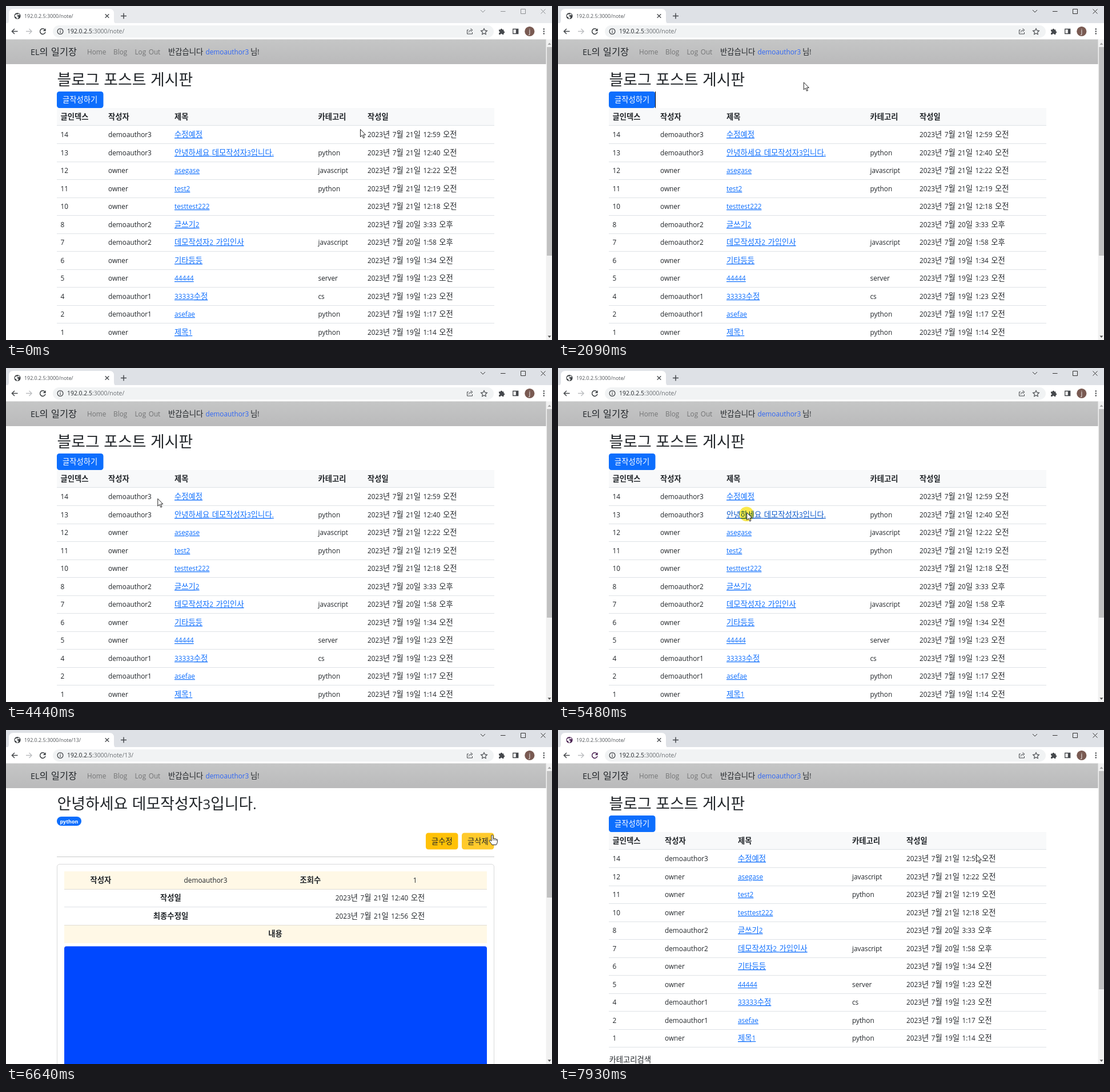
An HTML page that plays this animation: 956x586 px, repeating every 7990 ms.

```html
<!DOCTYPE html>
<html lang="ko">
<head>
<meta charset="utf-8">
<title>Board</title>
<style>
  html, body { margin: 0; width: 100%; height: 100%; overflow: hidden; background: #fff; }
  svg { display: block; width: 956px; height: 586px; fill: #212529; word-spacing: .12em;
        font: 11.8px "Open Sans", "Noto Sans CJK KR", "Noto Sans CJK JP", sans-serif; }
  .ko { font-family: "Noto Sans CJK KR", "Noto Sans CJK JP", sans-serif; font-size: 1.13em; }
  .bold { font-weight: 700; }
  .mid { text-anchor: middle; }
  .heading { font-size: 23.8px; }
  .link { fill: #0d6efd; text-decoration: underline 1px; }
  .link.over { fill: #0a58ca; }
  .blue { fill: #0d6efd; }
  .blue.over { fill: #0b5ed7; }
  .yellow { fill: #ffc107; }
  .yellow.over { fill: #ffca2c; }
  .icon { fill: none; stroke: #45484c; stroke-width: 1.3; }
  .muted { fill: #737475; }
  #click { fill: #fbe94a; mix-blend-mode: multiply; }
</style>
</head>
<body>
<svg id="stage" viewBox="0 0 956 586"></svg>
<script>
const LOOP = 7990;
const HOST = '192.0.2.5', PORT = ':3000', LIST = '/note/', POST = '/note/13/';
const GREETING = '안녕하세요 데모작성자3입니다.';

// Hangul runs are set a little larger than the Latin around them.
const text = (x, y, s, attrs = '') =>
  `<text x="${x}" y="${y}" ${attrs}>${s.replace(/[가-힣]+/g, '<tspan class="ko">$&</tspan>')}</text>`;
const rect = (x, y, w, h, attrs = '') =>
  `<rect x="${x}" y="${y}" width="${w}" height="${h}" ${attrs}/>`;
const icon = (d, attrs = '') => `<path class="icon" d="${d}" ${attrs}/>`;
const fill = (d, attrs = '') => `<path d="${d}" ${attrs}/>`;
const rule = (x, y, w, color = '#dee2e6') => rect(x, y, w, 1, `fill="${color}"`);

const rows = [
  '14|demoauthor3|수정예정||21일 12:59 오전',
  `13|demoauthor3|${GREETING}|python|21일 12:40 오전`,
  '12|owner|asegase|javascript|21일 12:22 오전',
  '11|owner|test2|python|21일 12:19 오전',
  '10|owner|testtest222||21일 12:18 오전',
  '8|demoauthor2|글쓰기2||20일 3:33 오후',
  '7|demoauthor2|데모작성자2 가입인사|javascript|20일 1:58 오후',
  '6|owner|기타등등||19일 1:34 오전',
  '5|owner|44444|server|19일 1:23 오전',
  '4|demoauthor1|33333수정|cs|19일 1:23 오전',
  '2|demoauthor1|asefae|python|19일 1:17 오전',
  '1|owner|제목1|python|19일 1:14 오전'
].map(row => row.split('|'));

function listPage(id, items, columns) {
  const heads = ['글인덱스', '작성자', '제목', '카테고리', '작성일'];
  const body = items.map((cells, i) => {
    const y = Math.round(230 + i * 31.5);
    return cells.map((cell, c) =>
      text(columns[c], y, c === 4 ? '2023년 7월 ' + cell : cell, c === 2 ? 'class="link hot"' : '')
    ).join('') + rule(89, y + 11, 766);
  }).join('');
  return `<g id="${id}">
    ${text(89.5, 139, '블로그 포스트 게시판', 'class="heading"')}
    ${rect(89, 150, 81.5, 29, 'rx="4.5" class="blue hot"')}
    ${text(129.7, 169, '글작성하기', 'class="mid" fill="#fff"')}
    ${rect(89, 179, 766, 31, 'fill="#f8f9fa"')}
    ${heads.map((h, c) => text(columns[c], 199, h, 'class="bold"')).join('')}
    ${rule(89, 209, 766)}${body}
    ${text(89.5, 582.5, items.length < 12 ? '카테고리검색' : '')}
  </g>`;
}

function detailPage() {
  const mid = (x, y, s, bold) => text(x, y, s, `class="mid${bold ? ' bold' : ''}"`);
  const button = (x, label) =>
    rect(x, 180.5, 56.5, 29, 'rx="4.5" class="yellow hot"') + mid(x + 28.3, 200, label);
  return `<g id="detail">
    ${text(89.5, 139, GREETING, 'class="heading"')}
    ${rect(89, 152, 43, 16, 'rx="8" class="blue"')}
    ${text(110.5, 163.5, 'python', 'class="mid bold" font-size="9" fill="#fff"')}
    ${button(735, '글수정')}${button(798, '글삭제')}
    ${rule(89, 222, 766, '#c8cacb')}
    ${rect(89.5, 235.5, 765, 400, 'rx="4.5" fill="none" stroke="#d8d9da"')}
    ${rect(102, 248, 740, 31, 'fill="#fff8e6"')}${rect(102, 342, 740, 32, 'fill="#fff8e6"')}
    ${rule(102, 279, 740, '#e0ddd5')}${rule(102, 310, 740)}${rule(102, 342, 740, '#e0ddd5')}
    ${mid(166, 268, '작성자', 1)}${mid(349.5, 268, 'demoauthor3')}
    ${mid(533, 268, '조회수', 1)}${mid(716, 268, '1')}
    ${mid(288.5, 299, '작성일', 1)}${mid(655, 299, '2023년 7월 21일 12:40 오전')}
    ${mid(288.5, 331, '최종수정일', 1)}${mid(655, 331, '2023년 7월 21일 12:56 오전')}
    ${mid(471.5, 362, '내용', 1)}
    ${rect(102, 379.5, 740, 230, 'rx="4" fill="#0048ff"')}
  </g>`;
}

function browser() {
  return `${rect(0, 0, 956, 31, 'id="strip"')}
    ${fill('M0 31Q5 31 5 25V13Q5 5 13 5H181Q189 5 189 13V25Q189 31 194 31Z', 'fill="#fff"')}
    <g id="globe"><circle cx="20" cy="17.5" r="5.6"/>
      ${fill('M16 15.5l4-1.5 1 2-2 1.5 3 1.5-1 3-2 .5-1-3-2.5-1ZM21.5 13l2.5 2-1 1.5-2-1Z', 'fill="#fff"')}</g>
    ${icon('M17.5 13.2Q18.6 12.3 20 12.2', 'id="spinner" style="stroke:#ccc"')}
    ${text(32, 20.8, '', 'id="tabTitle" font-size="8.9" fill="#505458"')}
    ${icon('M173.7 14.2l6.6 6.6m0-6.6l-6.6 6.6')}${icon('M201 17.5h10M206 12.5v10', 'style="stroke-width:1.5"')}
    ${icon('M831 7l4 4 4-4M866 9.5h8.5M901.5 5.5h8v8h-8ZM936.5 5.5l8 8m0-8l-8 8', 'id="controls" style="stroke-width:1"')}
    ${rect(0, 30, 956, 29, 'fill="#fff"')}
    ${rect(82, 34, 772, 21.5, 'rx="10.7" fill="#f1f3f4"')}
    ${icon('M20.5 44.5H10.5M15 40l-4.6 4.5L15 49', 'style="stroke-width:1.5"')}
    ${icon('M35 44.5H45M40.5 40l4.6 4.5L40.5 49', 'style="stroke:#bbbdc0"')}
    <g id="reload">${icon('M67.9 41.4A4.8 4.8 0 1 0 69 45.7', 'style="stroke:currentColor;stroke-width:1.5"')}
      ${fill('M69.6 39.2v4.9h-4.9Z', 'fill="currentColor"')}</g>
    ${icon('M60 40l8.6 8.6m0-8.6l-8.6 8.6', 'id="stop" style="stroke-width:1.5"')}
    <circle class="icon" cx="95" cy="44.5" r="4.9"/>${icon('M95 44v3.2M95 41.6v1.3')}
    <text x="107" y="48.3" font-size="10.4">${HOST}<tspan id="address" fill="#6a6e72"></tspan></text>
    ${icon('M810 42h-2.5v7h9v-3M810 46.5q.5-4 5-4.5M813.5 39.5l3.5 2.8-3.5 2.8', 'style="stroke-width:1"')}
    ${icon('M837 39.5l1.6 3.4 3.8.5-2.8 2.6.7 3.7-3.3-1.8-3.3 1.8.7-3.7-2.8-2.6 3.8-.5Z', 'style="stroke-width:1.1"')}
    ${fill('M863 41.5h2.7a1.7 1.7 0 0 1 3.4 0h2.4v2.7a1.7 1.7 0 0 1 0 3.4v2.4h-2.7a1.5 1.5 0 0 0-3 0H863v-2.6a1.6 1.6 0 0 0 0-3.2Z', 'fill="#45484c"')}
    ${icon('M887.7 40.5h9v8h-9Z')}${rect(892.8, 40.5, 4, 8, 'fill="#45484c"')}
    <circle cx="916.8" cy="44.5" r="8.6" fill="#795a52"/>
    ${text(916.8, 48, 'j', 'class="mid" font-size="11" fill="#fff"')}
    ${[40.5, 44.5, 48.5].map(y => `<circle cx="941.8" cy="${y}" r="1.2" fill="#45484c"/>`).join('')}`;
}

function siteBar() {
  return `<linearGradient id="grey" x2="0" y2="1"><stop stop-color="#c5c6c6"/><stop offset="1" stop-color="#bababb"/></linearGradient>
    ${rect(0, 58.5, 946, 43.5, 'fill="url(#grey)"')}
    ${text(43, 86, 'EL의 일기장', 'font-size="14.5"')}
    ${text(142, 85, 'Home', 'class="muted"')}${text(188, 85, 'Blog', 'class="muted"')}
    ${text(225.5, 85, 'Log Out', 'class="muted"')}${text(284, 85, '반갑습니다')}
    ${text(349.5, 85, 'demoauthor3', 'class="hot" fill="#2f66f5"')}${text(428, 85, '님!')}
    ${rect(945.5, 58.5, 11, 528, 'fill="#f1f1f1"')}
    ${rect(947, 72, 9, 366, 'id="thumb" fill="#c1c1c1"')}
    ${fill('M948.5 68h6l-3-3.5Z', 'fill="#a3a3a3"')}${fill('M948.5 578.5h6l-3 3.5Z', 'fill="#505050"')}`;
}

const stage = document.getElementById('stage');
stage.innerHTML = rect(0, 0, 956, 586, 'fill="#fff"') +
  listPage('before', rows, [95.5, 179, 295, 546.5, 633]) +
  detailPage() +
  listPage('after', rows.filter(row => row[0] !== '13'), [95.5, 187, 315, 515, 610]) +
  browser() + siteBar() +
  rect(170, 150, 1, 29, 'id="caret" fill="#000"') +
  `<circle id="click" r="12.7"/>
  <g id="pointer">
    ${fill('M.5.5V13.5L3.5 10.7 5.7 15.7 7.7 14.8 5.6 10H9.6Z', 'id="arrow" fill="#fff" stroke="#222"')}
    <g id="hand">
      ${fill('M-1.5 1Q0-1 1.5 1V6.5Q3.5 5.2 4.5 7 6 6 7 7.8 8.8 7 9 9V12.5Q8.5 15 7 17.5H-.5Q-2 14.5-5 11.2-5.6 9-3.8 9L-1.5 11Z', 'fill="#fff" stroke="#222"')}
      ${icon('M1.5 6.5V10M4.5 7V10M7 8V10.5', 'style="stroke:#222;stroke-width:.8"')}
    </g>
  </g>`;

const $ = id => document.getElementById(id);
const show = (id, on) => { $(id).style.display = on ? '' : 'none'; };
const hotspots = [...document.querySelectorAll('.hot')];

// Pointer route: time, x, y
const route = [
  [130, 620, 216], [400, 540, 246], [610, 450, 272], [800, 402, 258], [960, 385, 196], [1300, 420, 161],
  [1890, 420, 161], [2090, 430, 133], [2400, 365, 262], [2710, 225, 268], [2780, 225, 266],
  [2920, 225, 266], [3400, 386, 84], [3540, 408, 66], [3750, 398, 78], [3900, 422, 76],
  [4580, 225, 268], [4620, 225, 268], [5410, 330, 253],
  [5820, 331, 254], [6200, 560, 222], [6500, 835, 192], [6640, 852, 184], [6780, 770, 185],
  [6920, 765, 202], [7130, 823, 192], [7800, 823, 192], [7930, 732, 218]
];

function pointerAt(t) {
  const next = route.findIndex(key => key[0] > t);
  if (next < 1) return (next ? route.at(-1) : route[0]).slice(1);
  const [t0, x0, y0] = route[next - 1], [t1, x1, y1] = route[next];
  const k = (t - t0) / (t1 - t0);
  return [x0 + (x1 - x0) * k, y0 + (y1 - y0) * k];
}

const within = (t, from, to) => t >= from && t < to;

function draw(t) {
  const page = t < 5620 ? 'before' : t < 7470 ? 'detail' : 'after';
  for (const id of ['before', 'detail', 'after']) show(id, id === page);
  $('thumb').setAttribute('height', { before: 366, detail: 222, after: 383 }[page]);

  const active = t >= 1560;
  $('strip').setAttribute('fill', active ? '#dee1e6' : '#e8eaed');
  $('controls').style.stroke = active ? '#333' : '#8c8f92';

  const loading = within(t, 5550, 5620) || within(t, 7330, 7470);
  show('globe', !loading);
  show('reload', !loading);
  show('spinner', loading);
  show('stop', loading);
  const ink = page === 'after' ? '#4b2453' : '#3c4043';
  $('globe').style.fill = $('reload').style.color = ink;

  const path = PORT + (within(t, 5550, 7330) ? POST : LIST);
  $('address').textContent = path;
  $('tabTitle').textContent = HOST + path;

  show('caret', within(t, 1560, 5620) && Math.floor(Math.max(0, t - 1600) / 530) % 2 === 0);

  const [x, y] = pointerAt(t);
  let hover = false;
  for (const spot of hotspots) {
    const box = spot.getBoundingClientRect();
    const over = x >= box.left && x <= box.right && y >= box.top && y <= box.bottom;
    spot.classList.toggle('over', over);
    hover ||= over;
  }
  const hand = hover && !within(t, 5480, 5620);
  show('arrow', !hand);
  show('hand', hand);
  show('click', within(t, 1560, 1690) || within(t, 5480, 5620) || within(t, 7270, 7400));
  $('click').setAttribute('transform', `translate(${x} ${y + 3})`);
  $('pointer').setAttribute('transform', `translate(${x} ${y})`);
}

function tick() {
  draw(performance.now() % LOOP);
  requestAnimationFrame(tick);
}
tick();
</script>
</body>
</html>
```
